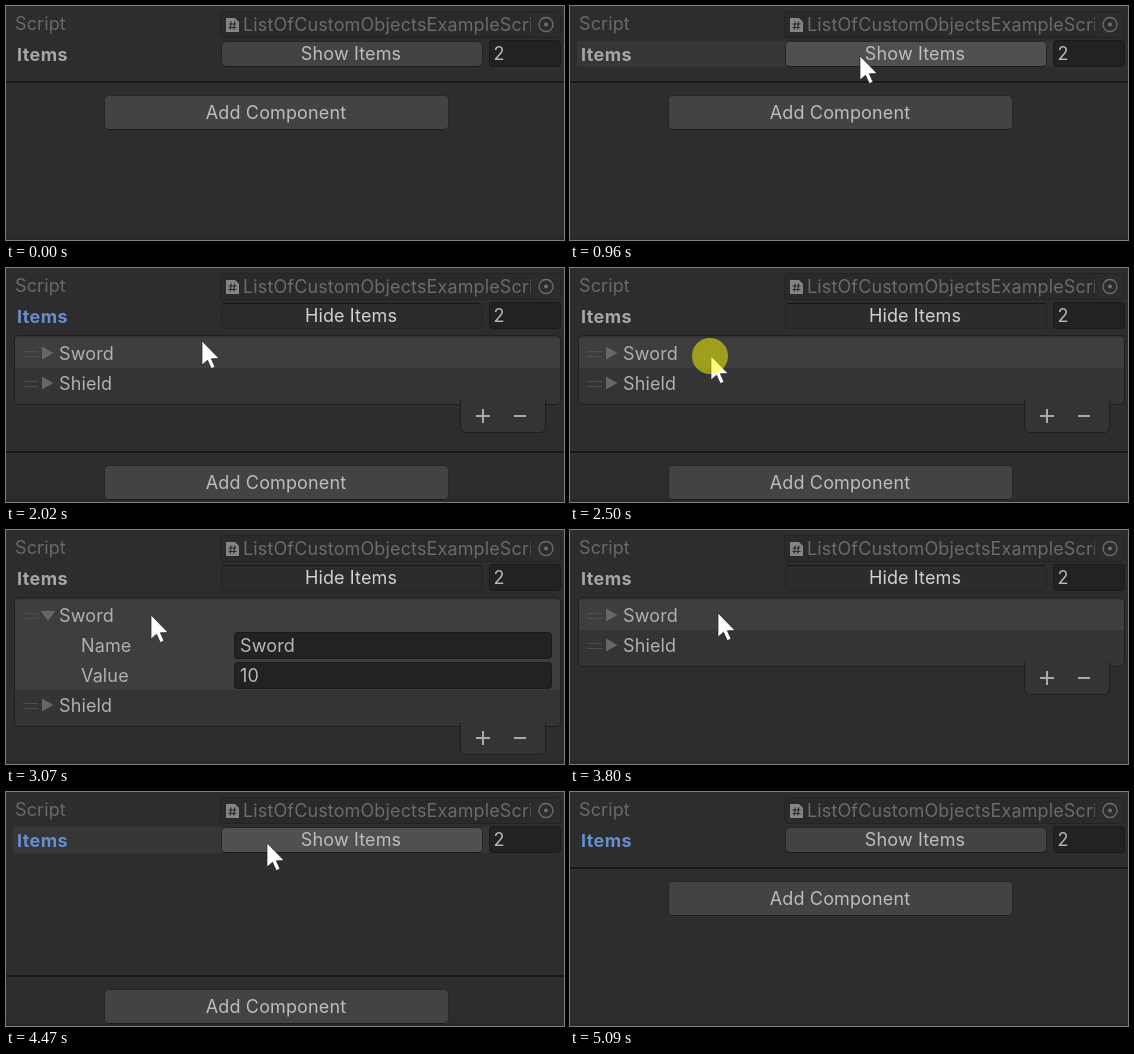
An HTML page with a canvas that plays this animation: 558 by 234 pixels, repeating every 5.49 s.

```html
<!DOCTYPE html>
<html lang="en">
<head>
<meta charset="utf-8">
<title>Inspector list</title>
<style>
html, body { margin: 0; width: 100%; height: 100%; overflow: hidden; background: #2d2d2d; }
canvas { display: block; width: 558px; height: 234px; }
</style>
</head>
<body>
<canvas id="stage" width="558" height="234"></canvas>
<script>
const LOOP = 5490;
const ctx = document.getElementById('stage').getContext('2d');
const FONT = 'Inter, Roboto, sans-serif';

// Moments (ms) at which the interface reacts
const PRESS_SHOW = 1350, OPEN = 1490, SELECT = 2500, EXPAND = 2570;
const PRESS_FOLD = 3730, COLLAPSE = 3800, RELAYOUT = 3870;
const PRESS_HIDE = 4400, CLOSE = 4470, SETTLE = 4540;
const ENTER = 470, LEAVE = 5090;
const FOLD_HEIGHT = 60;

// Pointer moves: first and last step time, number of steps, bend, end point
const START = [264, 232];
const MOVES = [
  { from: 470, to: 960, steps: 8, via: [308, 112], end: [290, 50] },
  { from: 1030, to: 1090, steps: 2, end: [297, 37] },
  { from: 1750, to: 2230, steps: 8, via: [205, 72], end: [140, 91] },
  { from: 2300, to: 2300, steps: 1, end: [141, 88] },
  { from: 2930, to: 3070, steps: 3, end: [145, 85] },
  { from: 3270, to: 3270, steps: 1, end: [148, 83] },
  { from: 3930, to: 4270, steps: 6, via: [205, 60], end: [261, 51] },
  { from: 4670, to: 4880, steps: 4, via: [310, 52], end: [349, 65] },
  { from: 4950, to: 5020, steps: 2, via: [368, 102], end: [382, 156] }
];

const within = (t, a, b) => t >= a && t < b;

function pointerAt(t) {
  let pos = START;
  for (const m of MOVES) {
    if (t < m.from) break;
    const gap = m.steps > 1 ? (m.to - m.from) / (m.steps - 1) : 1;
    const step = Math.min(m.steps, 1 + Math.floor((t - m.from) / gap + 1e-6));
    const k = step / m.steps;
    const u = k * (1.4 - 0.4 * k);
    const a = pos, b = m.end;
    const via = m.via || [(a[0] + b[0]) / 2, (a[1] + b[1]) / 2];
    pos = a.map((p, i) => (1 - u) ** 2 * p + 2 * u * (1 - u) * via[i] + u * u * b[i]);
    pos = pos.map(Math.round);
  }
  return pos;
}

function rect(x, y, w, h, color) {
  ctx.fillStyle = color;
  ctx.fillRect(x, y, w, h);
}

function box(x, y, w, h, r, fill, stroke) {
  ctx.beginPath();
  ctx.roundRect(x + 0.5, y + 0.5, w - 1, h - 1, r);
  ctx.fillStyle = fill;
  ctx.fill();
  ctx.strokeStyle = stroke;
  ctx.lineWidth = 1;
  ctx.stroke();
}

function poly(points, color) {
  ctx.beginPath();
  points.forEach(([x, y]) => ctx.lineTo(x, y));
  ctx.closePath();
  ctx.fillStyle = color;
  ctx.fill();
}

function disc(x, y, r, color) {
  ctx.beginPath();
  ctx.arc(x, y, r, 0, Math.PI * 2);
  ctx.fillStyle = color;
  ctx.fill();
}

function text(str, x, y, color, align = 'left', weight = 400) {
  ctx.font = `${weight} 18px ${FONT}`;
  ctx.letterSpacing = weight > 400 ? '0.4px' : '0.13px';
  ctx.textAlign = align;
  ctx.fillStyle = color;
  ctx.fillText(str, x, y);
}

function scriptIcon(x, y) {
  poly([[x, y], [x + 9, y], [x + 13, y + 4], [x + 13, y + 14], [x, y + 14]], '#858585');
  ctx.strokeStyle = '#2a2a2a';
  ctx.lineWidth = 1.2;
  ctx.beginPath();
  for (const d of [0, 3.5]) {
    ctx.moveTo(x + 5.2 + d, y + 3.5);
    ctx.lineTo(x + 4.2 + d, y + 11.5);
    ctx.moveTo(x + 2.5, y + 6 + d);
    ctx.lineTo(x + 10.5, y + 6 + d);
  }
  ctx.stroke();
}

function scriptRow() {
  text('Script', 9, 24, '#696969');
  box(214, 5, 341, 27, 3, '#2a2a2a', '#232323');
  scriptIcon(220, 12);
  ctx.save();
  ctx.beginPath();
  ctx.rect(215, 6, 310, 25);
  ctx.clip();
  text('ListOfCustomObjectsExampleScript', 237, 25, '#6b6b6b');
  ctx.restore();
  rect(527, 6, 27, 25, '#2c2c2c');
  ctx.strokeStyle = '#6e6e6e';
  ctx.lineWidth = 1.3;
  ctx.beginPath();
  ctx.arc(540, 18.5, 7, 0, Math.PI * 2);
  ctx.stroke();
  disc(540, 18.5, 2, '#6e6e6e');
}

function itemsRow(t, hover, overButton) {
  if (hover) rect(7, 35, 548, 26, '#363636');
  const blue = within(t, PRESS_SHOW, SELECT) || t >= PRESS_HIDE;
  text('Items', 11, 55, blue ? '#678dcb' : '#a6a6a6', 'left', 700);
  const down = within(t, PRESS_SHOW, CLOSE);
  const fill = down ? '#2c2c2c' : overButton ? '#505050' : '#434343';
  box(215, 35, 262, 26, 4, fill, '#242424');
  rect(217, down ? 35 : 60, 258, 1, down ? '#161616' : '#1c1c1c');
  const label = within(t, OPEN, CLOSE) ? 'Hide Items' : 'Show Items';
  text(label, 345, 54, down ? '#d2d2d2' : '#bdbdbd', 'center');
  box(483, 34, 72, 27, 3, '#222', '#1a1a1a');
  text('2', 487.5, 54, '#b8b8b8');
}

function listItem(label, y, unfolded) {
  rect(17, y - 2, 15, 1, '#4e4e4e');
  rect(17, y + 3, 15, 1, '#4e4e4e');
  const arrow = unfolded
    ? [[35, y - 4], [49, y - 4], [42, y + 6]]
    : [[36, y - 6.5], [47.5, y], [36, y + 6.5]];
  poly(arrow, '#666');
  text(label, 53, y + 7, '#b0b0b0');
}

function field(label, value, y) {
  text(label, 75, y + 7, '#b0b0b0');
  box(228, y - 13, 318, 27, 3, '#222', '#1a1a1a');
  text(value, 234, y + 7, '#b8b8b8');
}

function list(unfolded) {
  const extra = unfolded ? FOLD_HEIGHT : 0;
  const base = 136 + extra;
  box(8, 67, 547, 70 + extra, 4, '#343434', '#1f1f1f');
  rect(9, 70, 545, 30 + extra, '#3e3e3e');
  listItem('Sword', 85, unfolded);
  if (unfolded) {
    field('Name', 'Sword', 115);
    field('Value', '10', 145);
  }
  listItem('Shield', 115 + extra, false);
  box(454, base - 4, 86, 33, [0, 0, 5, 5], '#343434', '#1f1f1f');
  rect(455, base - 5, 84, 6, '#343434');
  rect(470, base + 11, 14, 2, '#aaa');
  rect(476, base + 5, 2, 14, '#aaa');
  rect(508, base + 11, 12, 2, '#aaa');
}

function addComponent(y) {
  rect(0, y, 558, 2, '#191919');
  rect(0, y + 2, 558, 1, '#313131');
  box(98, y + 14, 345, 35, 4, '#434343', '#262626');
  rect(102, y + 48, 337, 1, '#1c1c1c');
  text('Add Component', 270, y + 38, '#bdbdbd', 'center');
}

function pointer(x, y) {
  const shape = [[0, 0], [0, 24], [5.5, 19.2], [9.3, 27.6], [13, 26], [9.4, 17.8], [17, 17.5]];
  poly(shape.map(([dx, dy]) => [x + dx, y + dy]), '#fff');
  ctx.strokeStyle = '#222';
  ctx.lineWidth = 0.7;
  ctx.stroke();
}

function draw(t) {
  const [x, y] = pointerAt(t);
  const shown = within(t, ENTER, LEAVE);
  const hover = shown && y >= 34 && y < 62;
  rect(0, 0, 558, 234, '#2d2d2d');
  rect(0, 231, 558, 3, '#292929');
  scriptRow();
  itemsRow(t, hover, hover && x >= 215 && x < 477);
  if (within(t, OPEN, CLOSE)) list(within(t, EXPAND, COLLAPSE));
  if (!within(t, EXPAND, RELAYOUT)) addComponent(within(t, OPEN, SETTLE) ? 183 : 75);
  if (shown) pointer(x, y);
  const clicked = within(t, PRESS_SHOW, OPEN) || within(t, SELECT, EXPAND) ||
    within(t, PRESS_FOLD, COLLAPSE) || within(t, PRESS_HIDE, CLOSE);
  if (clicked) disc(x - 1, y, 18, 'rgba(255, 255, 0, 0.5)');
}

const begin = performance.now();
function frame() {
  draw((performance.now() - begin) % LOOP);
  requestAnimationFrame(frame);
}
frame();
</script>
</body>
</html>
```
